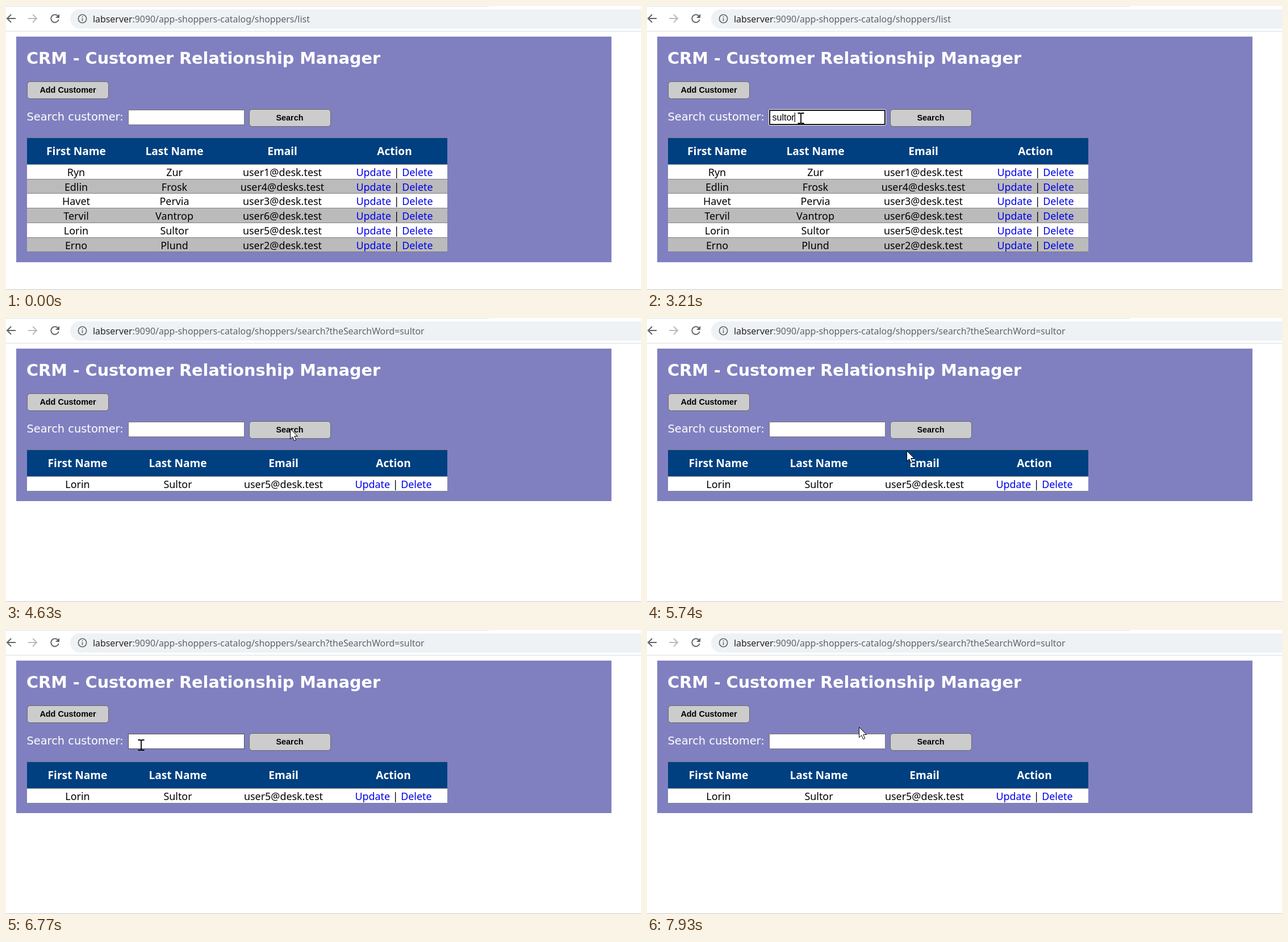
Animation of 1118 by 501 pixels, one loop 8000 ms. Source, as an HTML page:

```html
<!DOCTYPE html>
<html lang="en">
<head>
<meta charset="utf-8">
<title>CRM search</title>
<style>
  html, body { margin: 0; width: 100%; height: 100%; overflow: hidden; background: #fff; }
  svg { display: block; width: 100%; height: 100%; }
  text { white-space: pre; }
  .url { font: 15.88px "Noto Sans", "Open Sans", sans-serif; fill: #5f6368; }
  .host { fill: #202124; }
  .title { font: bold 28.7px "DejaVu Sans", sans-serif; fill: #fff; }
  .label { font: 19.4px "DejaVu Sans", sans-serif; fill: #fff; }
  .btn rect { fill: #ccc; stroke: #666; }
  .btn text { font: bold 14.4px "Liberation Sans", Arial, sans-serif; text-anchor: middle; }
  .typed { font: 16px "Liberation Sans", Arial, sans-serif; }
  .head { font: bold 19.1px "Noto Sans", sans-serif; fill: #fff; text-anchor: middle; }
  .cell { font: 17.9px "Noto Sans", sans-serif; text-anchor: middle; }
  .link { fill: #00e; }
  .icon { fill: none; stroke: #5f6368; stroke-width: 2; }
</style>
</head>
<body>
<svg viewBox="0 0 1118 501">
  <rect width="850" height="1" fill="#dee1e6"/>
  <rect x="113" y="6" width="1040" height="34" rx="17" fill="#eff2f4"/>
  <rect y="44" width="1118" height="1" fill="#dadce0"/>
  <rect y="500" width="1118" height="1" fill="#c6c6c6"/>
  <path class="icon" d="M17 22H2M9 15L2 22L9 29"/>
  <path class="icon" d="M39 22H54M47 15L54 22L47 29" style="stroke:#bbb"/>
  <path class="icon" d="M91.5 18A6.8 6.8 0 1 0 92.6 24"/>
  <path d="M94 14V21H87Z" fill="#5f6368"/>
  <g class="icon" style="stroke-width:1.6">
    <circle cx="134.5" cy="22.5" r="7.2"/>
    <path d="M134.5 21.5V26.5M134.5 18.3V20"/>
  </g>
  <text class="url" x="153" y="28.5"><tspan class="host">labserver</tspan><tspan id="path"></tspan></text>

  <rect id="panel" x="18" y="54" width="1048" fill="#8080c0"/>
  <text class="title" x="36" y="102">CRM - Customer Relationship Manager</text>
  <text class="label" x="36.5" y="201.5">Search customer:</text>
  <g class="btn">
    <rect x="37.5" y="133.5" width="143" height="30" rx="5"/>
    <text x="109" y="153">Add Customer</text>
    <rect x="428.5" y="182.5" width="143" height="30" rx="5"/>
    <text x="499.5" y="202">Search</text>
  </g>

  <rect id="field" x="215.5" y="183.5" width="204" height="26" fill="#fff"/>
  <g id="ring" fill="none">
    <rect x="214.5" y="182.5" width="206" height="28" rx="2" stroke="#fff"/>
    <rect x="216" y="184" width="203" height="25" rx="1" stroke="#101010" stroke-width="2"/>
  </g>
  <text class="typed" id="typed" x="220.5" y="202"></text>
  <path id="wave" fill="none" stroke="#e03030" stroke-width="1.1"/>
  <rect id="caret" y="188" width="1.2" height="17"/>

  <g id="full"></g>
  <g id="found"></g>

  <path id="arrow" d="M.5 .5V18.6L4.7 14.7L7.6 21.6L10.7 20.3L7.8 13.5H13.4Z" fill="#fff" stroke="#000"/>
  <path id="beam" d="M-5.5 -9H-1.5L0 -8L1.5 -9H5.5M0 -8V8M-5.5 9H-1.5L0 8L1.5 9H5.5" fill="none" stroke="#000" stroke-width="1.8"/>
</svg>
<script>
const LOOP = 8000, FOCUS = 1710, SPELL = 4210, PAGE = 4530, BLINK = 500;
const WORD = 'sultor';
const BASE = ':9090/app-shoppers-catalog/shoppers/';
const people = [
  ['Ryn', 'Zur', 'user1@desk.test'],
  ['Edlin', 'Frosk', 'user4@desks.test'],
  ['Havet', 'Pervia', 'user3@desk.test'],
  ['Tervil', 'Vantrop', 'user6@desk.test'],
  ['Lorin', 'Sultor', 'user5@desk.test'],
  ['Erno', 'Plund', 'user2@desk.test']
];

// The typist speeds up slightly through the word
const keyTimes = [...WORD].map((_, i) => 2640 + 570 * (i / 5) ** 0.8);

// Each move eases from the last stop, sagging below the straight line
const home = [431, 490];
const moves = [
  { from: 510, to: 1140, end: [262, 187] },
  { from: 1390, to: 1600, end: [264, 195] },
  { from: 1630, to: 1790, end: [271, 198] },
  { from: 3700, to: 4030, end: [486, 235], sag: 18 },
  { from: SPELL, to: 4330, end: [500, 195] },
  { from: 5270, to: 5440, end: [480, 222] },
  { from: 5670, to: 6770, end: [238, 203], sag: 40 },
  { from: 6860, to: 7170, end: [226, 203] },
  { from: 7350, to: 7690, end: [381, 185], sag: 12 },
  { from: 7820, to: 7930, end: [373, 171] }
];

const $ = id => document.getElementById(id);
const show = (id, on) => $(id).style.display = on ? '' : 'none';

function add(parent, tag, attrs, text = '') {
  const el = document.createElementNS('http://www.w3.org/2000/svg', tag);
  for (const k in attrs) el.setAttribute(k, attrs[k]);
  el.textContent = text;
  parent.append(el);
  return el;
}

function drawTable(g, rows, cols) {
  const band = (y, end, fill) => add(g, 'rect', { x: 37, y, width: 740, height: end - y, fill });
  const rule = y => band(y, y + 1, '#808080');
  const edge = r => Math.floor(279.5 + r * 25.7);

  band(232, 279, '#004080');
  rule(232);
  ['First Name', 'Last Name', 'Email', 'Action'].forEach((s, i) =>
    add(g, 'text', { class: 'head', x: cols[i], y: 263 }, s));

  rows.forEach((row, r) => {
    const y = Math.round(300 + r * 25.7);
    band(edge(r), edge(r + 1), r % 2 ? '#bbb' : '#fff');
    rule(edge(r));
    row.forEach((s, i) => add(g, 'text', { class: 'cell', x: cols[i], y }, s));
    const action = add(g, 'text', { class: 'cell', x: cols[3], y });
    add(action, 'tspan', { class: 'link' }, 'Update');
    add(action, 'tspan', {}, ' | ');
    add(action, 'tspan', { class: 'link' }, 'Delete');
  });
  rule(edge(rows.length));
}

function pointerAt(t) {
  let [x, y] = home;
  for (const { from, to, end, sag = 0 } of moves) {
    if (t < from) break;
    const p = 1 - (1 - Math.min(1, (t - from) / (to - from))) ** 1.5;
    x += (end[0] - x) * p;
    y += (end[1] - y) * p + 4 * sag * p * (1 - p);
  }
  return [Math.round(x), Math.round(y)];
}

function render(t) {
  const searched = t >= PAGE;
  const focused = t >= FOCUS && !searched;
  const typed = searched ? [] : keyTimes.filter(k => k <= t);
  const [x, y] = pointerAt(t);
  const hover = x > 215 && x < 420 && y > 183 && y < 210;

  show('full', !searched);
  show('found', searched);
  $('panel').setAttribute('height', searched ? 269 : 398);
  $('path').textContent = BASE + (searched ? 'search?theSearchWord=' + WORD : 'list');

  $('field').setAttribute('stroke', hover ? '#4f4f4f' : '#767676');
  show('ring', focused);
  $('typed').textContent = WORD.slice(0, typed.length);
  show('wave', t >= SPELL && !searched);

  // The caret restarts its blink at every key
  const since = t - (typed.at(-1) ?? FOCUS);
  show('caret', focused && Math.floor(since / BLINK) % 2 === 0);
  $('caret').setAttribute('x', 220.5 + (typed.length ? $('typed').getComputedTextLength() : 0));

  show('beam', hover);
  show('arrow', !hover && t >= moves[0].from);
  $(hover ? 'beam' : 'arrow').setAttribute('transform', `translate(${x} ${y})`);
}

drawTable($('full'), people, [123.5, 296.5, 486.5, 684]);
drawTable($('found'), people.slice(4, 5), [126, 302.5, 488.5, 682]);
$('wave').setAttribute('d', 'M220.5 205' + 'l2 -2l2 2'.repeat(9) + 'l2 -2');

const start = performance.now();
function tick() {
  render((performance.now() - start) % LOOP);
  requestAnimationFrame(tick);
}
tick();
</script>
</body>
</html>
```
